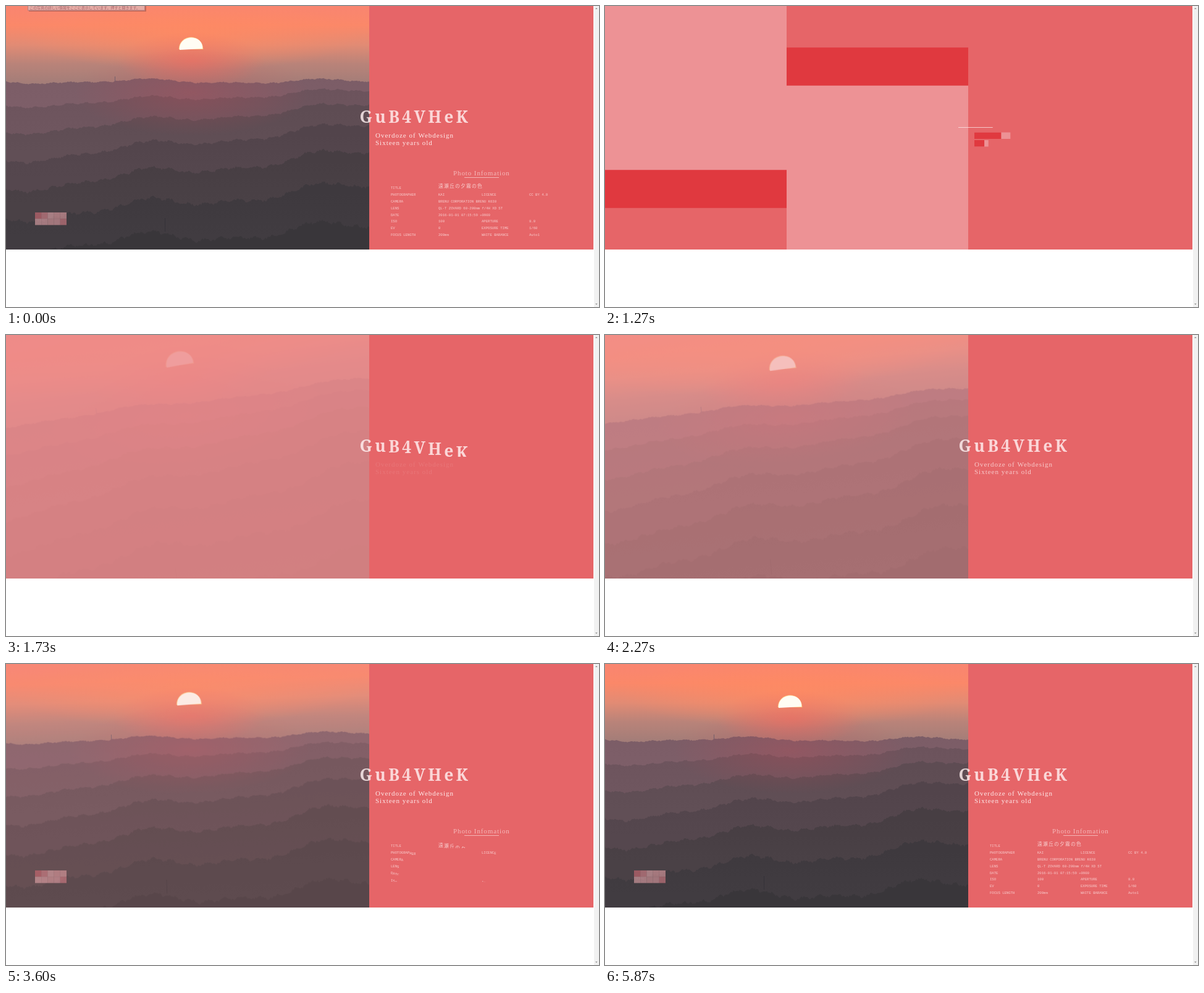
Write an HTML page with a canvas that moves like this. It is 960x487 px and loops after 5940 ms.

```html
<!DOCTYPE html>
<html lang="en">
<head>
<meta charset="utf-8">
<title>Photo profile</title>
<style>
  html, body { margin: 0; width: 100%; height: 100%; overflow: hidden; background: #fff; }
  canvas { display: block; width: 960px; height: 487px; }
</style>
</head>
<body>
<canvas id="stage" width="960" height="487"></canvas>
<script>
const LOOP = 5940;
const W = 588, H = 394, PAD = 90;
const CORAL = '#e66568', DARK = '#e0393f', PALE = '#ed9295';
const SERIF = '"Liberation Serif", serif';
const CJK = '"Noto Sans CJK JP", "Noto Sans CJK", sans-serif';
const ctx = document.getElementById('stage').getContext('2d');

const clamp = v => Math.max(0, Math.min(1, v));
const inOut = u => u < .5 ? 2 * u * u : 1 - 2 * (1 - u) ** 2;
const rect = (c, color, x, y, w, h) => { c.fillStyle = color; c.fillRect(x, y, w, h); };

function seeded(seed) {
  return () => (seed = (seed * 16807) % 2147483647) / 2147483647;
}

function faded(alpha, paint) {
  ctx.save();
  ctx.globalAlpha *= clamp(alpha);
  paint();
  ctx.restore();
}

function verticalGradient(c, y0, y1, colors) {
  const g = c.createLinearGradient(0, y0, 0, y1);
  colors.forEach((color, i) => g.addColorStop(i / (colors.length - 1), color));
  return g;
}

function glow(c, x, y, rx, ry, rgb, alpha) {
  c.save();
  c.translate(x, y);
  c.scale(rx, ry);
  const g = c.createRadialGradient(0, 0, 0, 0, 0, 1);
  g.addColorStop(0, `rgba(${rgb},${alpha})`);
  g.addColorStop(1, `rgba(${rgb},0)`);
  rect(c, g, -1, -1, 2, 2);
  c.restore();
}

// Ridges get lower, darker and rougher towards the viewer; the middle ones climb to the right.
function paintRidge(c, i) {
  const random = seeded(97 * i + 13);
  const base = 122 + 24 * i + 3 * i * i;
  const climb = 60 * Math.sin(Math.PI * i / 7.5);
  const swell = 3 + i, rough = 1.5 + i * .45, phase = random() * 6;
  const tone = light => {
    const u = (1 - i / 6) ** 1.4;
    return `rgb(${57 + 66 * u + light},${54 + 38 * u + light},${58 + 44 * u + light})`;
  };
  c.fillStyle = verticalGradient(c, base - 15, base + 55, [tone(0), tone(i < 6 ? 3 : 0)]);
  c.beginPath();
  c.moveTo(-PAD, H + PAD);
  for (let x = -PAD; x <= W + PAD; x += 2) {
    const hills = Math.sin(x * .021 + phase) + .5 * Math.sin(x * .047 + phase * 2);
    const trees = .5 * Math.sin(x * .23 + phase) + random() - .5;
    c.lineTo(x, base + climb * (.5 - x / W) + swell * hills + rough * trees);
  }
  c.lineTo(W + PAD, H + PAD);
  c.fill();
}

function paintPhoto() {
  const canvas = document.createElement('canvas');
  canvas.width = W + 2 * PAD;
  canvas.height = H + 2 * PAD;
  const c = canvas.getContext('2d');
  c.translate(PAD, PAD);

  const sky = verticalGradient(c, 0, 125, ['#f98570', '#fb8869', '#e28b74', '#b98379', '#a37d78']);
  rect(c, sky, -PAD, -PAD, W + 2 * PAD, H + 2 * PAD);
  glow(c, 300, 45, 280, 60, '255,138,98', .85);
  glow(c, 300, 88, 120, 45, '240,114,100', .7);

  c.fillStyle = '#ffd08a';
  c.beginPath();
  c.arc(299.5, 70, 19.8, Math.PI, 0);
  c.fill();
  c.fillStyle = '#fffdf4';
  c.beginPath();
  c.moveTo(281, 71);
  c.bezierCurveTo(279, 45, 320, 45, 318, 69);
  c.fill();

  for (let i = 0; i < 7; i++) {
    paintRidge(c, i);
    if (i === 2) glow(c, 300, 140, 190, 70, '195,72,84', .3);
  }
  rect(c, '#75606a', 176, 114, 1, 8);
  rect(c, '#353238', 257, 343, 1, 22);
  return canvas;
}

const photo = paintPhoto();

function drawPhoto(t) {
  const left = clamp((5870 - t) / 4400) ** 2.7;
  if (left >= 1) return;
  faded((t - 1480) / 300, () => rect(ctx, PALE, 0, 0, W, H));
  faded(1 - left, () => {
    ctx.beginPath();
    ctx.rect(0, 0, W, H);
    ctx.clip();
    ctx.translate(W / 2, H / 2);
    ctx.rotate(-8.6 * left * Math.PI / 180);
    ctx.scale(1 + .2 * left, 1 + .2 * left);
    ctx.drawImage(photo, -W / 2 - PAD, -H / 2 - PAD);
  });
}

// A block that grows from one side, then shrinks away to the other.
function wipe(t, start, half, color, x, y, w, h, side) {
  const u = (t - start) / half;
  if (u <= 0 || u >= 2) return;
  const from = inOut(clamp(u - 1)), size = inOut(clamp(u)) - from;
  if (side === 'right') rect(ctx, color, x + w * from, y, w * size, h);
  if (side === 'down') rect(ctx, color, x, y + h * from, w, h * size);
  if (side === 'up') rect(ctx, color, x, y + h * (1 - from - size), w, h * size);
}

function drawBlocks(t) {
  ['down', 'up'].forEach((side, i) => {
    wipe(t, 1111, 226, DARK, i * W / 2, 0, W / 2, H, side);
    wipe(t, 1187, 141, PALE, i * W / 2, 0, W / 2, H, side);
  });
  for (const i of [0, 1]) {
    const y = 204.5 + 12.5 * i;
    wipe(t, 1162 + 41 * i, 228, PALE, 598, y, 127.5, 10.5, 'right');
    wipe(t, 1198 + 21 * i, 177 + 30 * i, DARK, 598, y, 127.5, 10.5, 'right');
  }
  wipe(t, 1221, 125, 'rgba(255,240,240,.7)', 572, 196, 174, 1, 'right');
}

// Letters rise one after another from behind a hidden lower edge.
function rise(t, text, x, base, start, o) {
  if (t < start) return;
  ctx.save();
  ctx.beginPath();
  ctx.rect(x - 5, base - 40, 240, 40 + o.below);
  ctx.clip();
  ctx.font = o.font;
  ctx.fillStyle = o.color;
  for (const [i, letter] of [...text].entries()) {
    const left = 1 - clamp((t - start - i * o.stagger) / o.time);
    if (left < 1) ctx.fillText(letter, x, base + o.drop * left * left);
    x += ctx.measureText(letter).width + o.gap;
  }
  ctx.restore();
}

const TITLE = { font: '900 26.5px "Noto Serif", serif', color: 'rgba(255,240,240,.82)',
  stagger: 35, time: 350, drop: 28, below: 8, gap: 4.3 };
const HEADING = { font: `11px ${SERIF}`, color: 'rgba(255,235,235,.62)',
  stagger: 35, time: 370, drop: 14, below: 3, gap: .9 };
const CELL = { font: '5.6px "Liberation Mono", monospace', color: 'rgba(255,240,240,.75)',
  stagger: 45, time: 370, drop: 7, below: 1.8, gap: 0 };
const KANJI = { ...CELL, font: `7.8px ${CJK}`, drop: 11, below: 4, gap: 1.2 };

// One line per row: label, value and, for some, a second pair.
const ROWS = `TITLE|
PHOTOGRAPHER|KAI|LICENCE|CC BY 4.0
CAMERA|BRENU CORPORATION BRENU K630
LENS|QL-T ZOVARD 60-200mm f/4H XD ST
DATE|2016-01-01 07:15:59 +0900
ISO|100|APERTURE|8.0
EV|0|EXPOSURE TIME|1/60
FOCUS LENGTH|200mm|WHITE BARANCE|Auto1`.split('\n').map(row => row.split('|'));

function drawTable(t) {
  let pair = 0;
  ROWS.forEach((row, r) => {
    const base = 296.4 + r * 10.8;
    for (let i = 0; i < row.length; i += 2, pair++) {
      const x = i ? 770 : 623;
      rise(t, row[i], x, base, 2850 + 97 * pair, CELL);
      rise(t, row[i + 1], x + 77, base, 3900 + 9 * pair * pair, CELL);
    }
  });
  rise(t, '遠瀬丘の夕霧の色', 700, 294, 3370, KANJI);
}

function drawHeading(t) {
  rise(t, 'Photo Infomation', 724, 274, 2350, HEADING);
  const line = 56 * inOut(clamp((t - 2500) / 600));
  rect(ctx, 'rgba(255,235,235,.6)', 770 - line / 2, 277, line, 1);
}

function drawSubtitle() {
  ctx.font = `11px ${SERIF}`;
  ctx.letterSpacing = '1px';
  ctx.fillStyle = '#fff0f0';
  ctx.fillText('Overdoze of Webdesign', 598, 213);
  ctx.fillText('Sixteen years old', 598, 225.4);
}

function drawMosaic() {
  const random = seeded(41), size = 10.2;
  for (let i = 0; i < 10; i++) {
    const shade = random();
    rect(ctx, `rgba(${205 + 20 * shade},${105 + 60 * shade},${115 + 55 * shade},.62)`,
      47 + (i % 5) * size, 334 + Math.floor(i / 5) * size, size, size);
  }
}

function drawTooltip() {
  rect(ctx, 'rgba(90,50,50,.35)', 37, 0, 190, 9);
  rect(ctx, '#b98083', 35, 0, 190, 7.5);
  rect(ctx, '#e6aca5', 36, 0, 188, 6.5);
  ctx.fillStyle = '#a9656c';
  ctx.font = `6px ${CJK}`;
  ctx.fillText('この写真の詳しい情報をここに表示しています。押すと開きます。', 38, 4.5);
}

function drawContent(t) {
  drawPhoto(t);
  drawBlocks(t);
  rise(t, 'GuB4VHeK', 572.5, 189, 1358, TITLE);
  faded(.95 * clamp((t - 1620) / 850), drawSubtitle);
  faded((t - 2950) / 450, drawMosaic);
  drawHeading(t);
  drawTable(t);
}

function drawScrollbar() {
  rect(ctx, '#f1f1f1', 952, 0, 8, 487);
  ctx.fillStyle = '#8a8a8a';
  for (const [y, d] of [[4, -1], [482.5, 1]]) {
    ctx.beginPath();
    ctx.moveTo(954, y - d);
    ctx.lineTo(957.6, y - d);
    ctx.lineTo(955.8, y + d);
    ctx.fill();
  }
}

function draw(t) {
  rect(ctx, '#fff', 0, 0, 960, 487);
  rect(ctx, CORAL, 0, 0, 951, H);
  // The finished page lingers and fades before the next entrance.
  const lingering = t < 1000;
  faded(lingering ? 1 - (t - 430) / 520 : 1, () => drawContent(lingering ? LOOP : t));
  if (t < 70) drawTooltip();
  drawScrollbar();
}

const began = performance.now();
function tick() {
  draw((performance.now() - began) % LOOP);
  requestAnimationFrame(tick);
}
tick();
</script>
</body>
</html>
```
